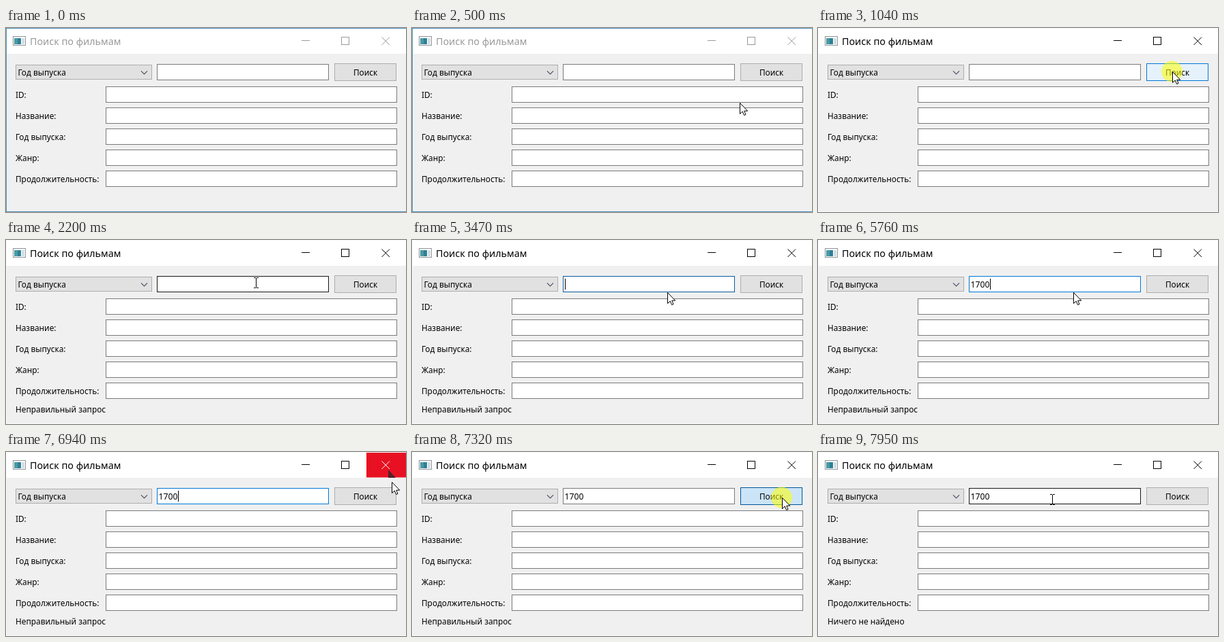
These frames come from a looping animation (586 px wide and 271 px high, 8 s). An HTML page:

```html
<!DOCTYPE html>
<html lang="ru">
<head>
<meta charset="utf-8">
<style>
  html, body { margin: 0; width: 100%; height: 100%; overflow: hidden; background: #f0f0f0; }
  svg { display: block; }
  text { font: 11.8px "Noto Sans", "Open Sans", sans-serif; white-space: pre; }
  #title { font-size: 14.3px; }
  #typed { font-size: 12.2px; }
  .box { fill: #fff; stroke: #7a7a7a; }
  .grey { fill: #e1e1e1; stroke: #adadad; }
  .crisp { shape-rendering: crispEdges; }
</style>
</head>
<body>
<svg width="586" height="271" viewBox="0 0 586 271">
  <rect width="586" height="271" fill="#f0f0f0"/>
  <rect width="586" height="38" fill="#fff"/>
  <path id="frame" class="crisp" d="M586 .5H.5V270.5H586" fill="none"/>

  <g class="crisp">
    <rect x="10.5" y="12.5" width="18" height="13" fill="#fff" stroke="#8b9499"/>
    <rect x="12" y="15" width="10" height="9" fill="#2d7f9b"/>
    <rect x="12" y="15" width="5" height="9" fill="#4b9a9f"/>
    <rect x="23" y="15" width="4" height="9" fill="#d5dde0"/>
  </g>
  <text id="title" x="35" y="25">Поиск по фильмам</text>
  <rect id="closeBg" x="528" y="1" width="58" height="36.5" fill="#e81123"/>
  <path id="ghost" d="M560 26V38H571Z" fill="#54202a"/>
  <g id="controls" fill="none">
    <path class="crisp" d="M433 18.5H445M491.5 13.5H502.5V24.5H491.5Z"/>
    <path id="closeX" d="M550.5 13.5L562 25M562 13.5L550.5 25"/>
  </g>

  <rect class="grey crisp" x="14.5" y="54.5" width="199" height="21"/>
  <text x="17.5" y="70">Год выпуска</text>
  <path d="M198 63.3L202.5 67.8L207 63.3" fill="none" stroke="#4a5068" stroke-width="1.2"/>
  <rect id="query" class="box crisp" x="221.5" y="53.5" width="251" height="23"/>
  <text id="typed" x="223.5" y="70"></text>
  <rect id="caret" y="57" width="1" height="16"/>
  <rect id="button" class="grey crisp" x="481.5" y="52.5" width="90" height="25"/>
  <text x="526.5" y="70" text-anchor="middle">Поиск</text>

  <g id="rows"></g>
  <text id="status" x="14" y="254"></text>

  <g id="cursor">
    <circle id="halo" cx="-.5" r="15.5" fill="#ff0" fill-opacity=".55"/>
    <path id="arrow" d="M.5 .5V16.5L4.2 13L6.6 18.5L9 17.5L6.7 12.2H11.7Z" fill="#fff" stroke="#000"/>
    <path id="beam" class="crisp" d="M-3 -7.5H0M1 -7.5H4M.5 -7V7M-3 7.5H0M1 7.5H4" fill="none" stroke="#000"/>
  </g>
</svg>
<script>
const $ = id => document.getElementById(id);
const set = (id, attrs) => { for (const k in attrs) $(id).setAttribute(k, attrs[k]); };
const show = (id, on) => set(id, { visibility: on ? 'inherit' : 'hidden' });
const within = (t, ...spans) => spans.some(([a, b]) => t >= a && t < b);

const labels = ['ID:', 'Название:', 'Год выпуска:', 'Жанр:', 'Продолжительность:'];
$('rows').innerHTML = labels.map((s, i) => {
  const y = 86 + 31 * i;
  return `<text x="14" y="${y + 17}">${s}</text>
    <rect id="row${i}" class="box crisp" x="146.5" y="${y + .5}" width="426" height="23"/>`;
}).join('');

// Pointer keys: time, x, y
const keys = [
  [0, 430, 170], [810, 519, 64], [1510, 519, 64], [2200, 366, 63],
  [2300, 366, 63], [2720, 370, 70], [3230, 370, 70], [3380, 374, 77],
  [6310, 374, 77], [6860, 560, 26], [6936, 565, 44], [7160, 542, 67],
  [7480, 542, 67], [7950, 343, 70], [8000, 343, 70]
];
// Bursts of evenly spaced screen updates: start, end, count
const bursts = [
  [70, 810, 11], [890, 1350, 7], [1580, 2200, 9], [2350, 2730, 6],
  [3300, 3560, 4], [6390, 7170, 11], [7240, 7950, 10]
];

function snap(t) {
  const b = bursts.filter(b => b[0] <= t).pop();
  if (!b) return 0;
  const [start, end, n] = b, step = (end - start) / (n - 1);
  return start + step * Math.min(n - 1, Math.floor((t - start) / step + .1));
}

function pointer(t) {
  const i = Math.max(1, keys.findIndex(k => k[0] > t));
  const [t0, x0, y0] = keys[i - 1], [t1, x1, y1] = keys[i];
  const p = (t - t0) / (t1 - t0), e = p * p * (3 - 2 * p);
  return [Math.round(x0 + (x1 - x0) * e), Math.round(y0 + (y1 - y0) * e)];
}

function draw(t) {
  const [x, y] = pointer(snap(t));
  const over = (l, top, r, b) => t >= 70 && x >= l && x < r && y >= top && y < b;
  const active = t >= 890, ink = active ? '#000' : '#999';

  set('frame', { stroke: active ? '#fafafa' : '#4a8db5' });
  set('title', { fill: ink });
  set('controls', { stroke: ink });
  const closing = within(t, [6775, 7010]);
  show('closeBg', closing);
  show('ghost', within(t, [6930, 7010]));
  set('closeX', { stroke: closing ? '#fff' : ink });

  const onQuery = over(221, 53, 473, 77);
  let onText = onQuery;
  labels.forEach((_, i) => {
    const hot = over(146, 86 + 31 * i, 573, 110 + 31 * i);
    onText ||= hot;
    $('row' + i).style.stroke = hot ? '#171717' : '';
  });

  const focused = within(t, [2400, 7310]);
  $('query').style.stroke = onQuery ? '#171717'
    : within(t, [3380, 3555]) ? '#0a5a9c'
    : focused ? '#0078d7' : '';

  const pressed = within(t, [1120, 1195], [7315, 7395]);
  const hot = over(481, 52, 572, 78);
  $('button').style.fill = pressed ? '#cce4f7' : hot ? '#e5f1fb' : '';
  $('button').style.stroke = pressed ? '#005499' : hot ? '#0078d7' : '';

  const count = [4350, 5450, 5610, 5760].filter(at => t >= at).length;
  $('typed').textContent = '1700'.slice(0, count);
  set('caret', { x: 224 + 7 * count });
  show('caret', within(t, [2400, 2900], [3450, 3950], [4350, 4980], [5450, 6390], [6930, 7310]));
  $('status').textContent = t < 1195 ? '' : t < 7395 ? 'Неправильный запрос' : 'Ничего не найдено';

  set('cursor', { transform: `translate(${x} ${y})` });
  show('cursor', t >= 70);
  show('halo', within(t, [890, 1345], [2350, 2725], [7240, 7475]));
  show('arrow', !onText);
  show('beam', onText);
}

const start = performance.now();
function tick() {
  draw((performance.now() - start) % 8000);
  requestAnimationFrame(tick);
}
tick();
</script>
</body>
</html>
```
